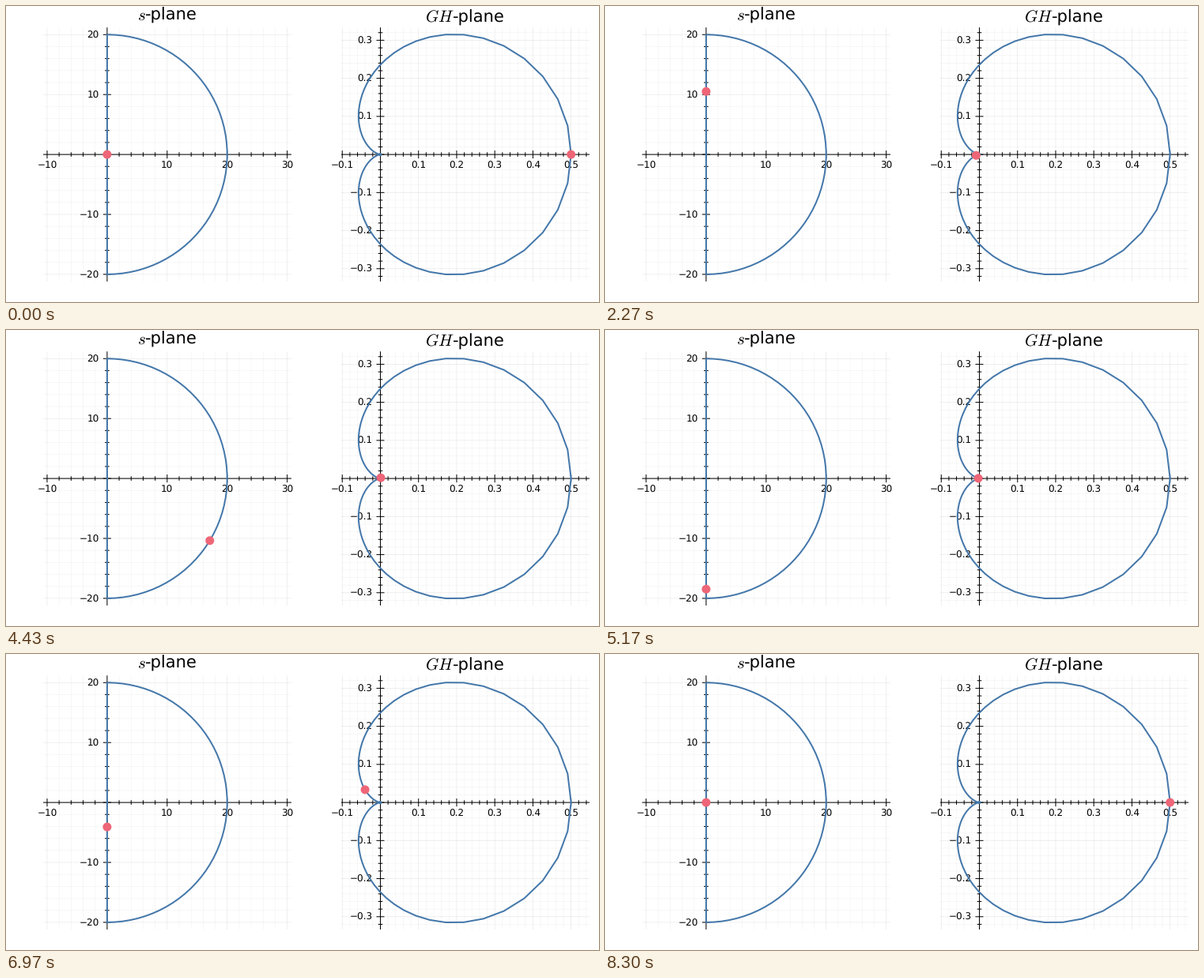
Recreate the animation shown at these times as a matplotlib script. Size 750 px wide and 375 px high, loop 8330 ms.

```python
import numpy as np
import matplotlib.pyplot as plt
from matplotlib.animation import FuncAnimation

W, H, DPI = 750, 375, 100
PX = 72 / DPI  # points per pixel
BLUE, RED = "#4477AA", "#EE6677"
SEG = 50       # samples per contour segment
LOOP_MS = 8330

plt.rcParams["font.family"] = "DejaVu Sans"
plt.rcParams["mathtext.fontset"] = "cm"
plt.rcParams["text.hinting"] = "none"

# Closed contour: up the imaginary axis, around the arc, back up to zero
near, mid, far = 0, 5, 20
up = [np.linspace(near, mid, SEG), np.linspace(mid, far, SEG)]
arc = far * np.exp(1j * np.linspace(np.pi / 2, -np.pi / 2, SEG))
down = [np.linspace(-far, -mid, SEG), np.linspace(-mid, near, SEG)]
s = np.concatenate([1j * np.concatenate(up), arc, 1j * np.concatenate(down)])
gh = 1 / ((s + 1) * (s + 2))

fig = plt.figure(figsize=(W / DPI, H / DPI), dpi=DPI, facecolor="white")
ax = fig.add_axes([0, 0, 1, 1])
ax.set_xlim(0, W)
ax.set_ylim(H, 0)
ax.axis("off")

TOP, BOTTOM, Y0 = 27.2, 349, 188.1


def label(v, digits):
    return f"{v:.{digits}f}".replace("-", "\u2212")


def plane(z, x0, left, right, unit, step, digits):
    """Draw one complex plane and return its moving dot and pixel path."""
    minor = unit * step / 5
    i0, i1 = int(np.ceil((left - x0) / minor)), int((right - x0) / minor)
    j1 = int((BOTTOM - Y0) / minor)
    cols, rows = np.arange(i0, i1 + 1), np.arange(-j1, j1 + 1)

    axis = dict(colors="black", lw=PX, zorder=2, snap=False)
    for major in (False, True):
        c = cols[(cols % 5 == 0) == major]
        r = rows[(rows % 5 == 0) == major]
        gx, gy = x0 + c * minor, Y0 - r * minor
        grid = dict(colors="black", lw=0.6 * PX, zorder=1, snap=False,
                    alpha=0.1 if major else 0.05)
        ax.vlines(gx, TOP, BOTTOM, **grid)
        ax.hlines(gy, left, right, **grid)
        half = 5 if major else 2.8
        ax.vlines(gx, Y0 - half, Y0 + half, **axis)
        ax.hlines(gy, x0 - half, x0 + half, **axis)
    ax.hlines(Y0, left, right, **axis)
    ax.vlines(x0, TOP, BOTTOM, **axis)

    font = dict(fontsize=12 * PX, va="baseline", zorder=3)
    for k in cols[(cols % 5 == 0) & (cols != 0)]:
        ax.text(x0 + k * minor, 205.4, label(k * step / 5, digits),
                ha="center", **font)
    for k in rows[(rows % 5 == 0) & (rows != 0)]:
        ax.text(x0 - 10, Y0 - k * minor + 4.4, label(k * step / 5, digits),
                ha="right", **font)

    x, y = x0 + unit * z.real, Y0 - unit * z.imag
    ax.plot(x, y, color=BLUE, lw=2 * PX, zorder=4, solid_joinstyle="round")
    dot = ax.add_patch(plt.Circle((x[0], y[0]), 5.5, fc=RED, lw=0, zorder=5))
    return dot, x, y


def title(symbol, end, start, y):
    """Math symbol ending at one x, plain text starting at another."""
    font = dict(fontsize=21 * PX, va="baseline", zorder=3)
    ax.text(end, y, f"${symbol}$", ha="right", **font)
    ax.text(start, y, "-plane", ha="left", **font)


planes = [
    plane(s, 127.9, 47, 361, 7.592, 10, 0),
    plane(gh, 473.5, 424, 738, 482.35, 0.1, 1),
]
title("s", 176.3, 176.3, 18)
title("GH", 567.2, 564.8, 21)

FRAMES = 2 * len(s)


def update(k):
    # Two frames per sample, each step centred on its nominal time
    i = (k + 1) // 2 % len(s)
    for dot, x, y in planes:
        dot.center = x[i], y[i]
    return [p[0] for p in planes]


anim = FuncAnimation(fig, update, frames=FRAMES, interval=LOOP_MS / FRAMES,
                     repeat=True, repeat_delay=0, blit=False)
plt.show()
```
